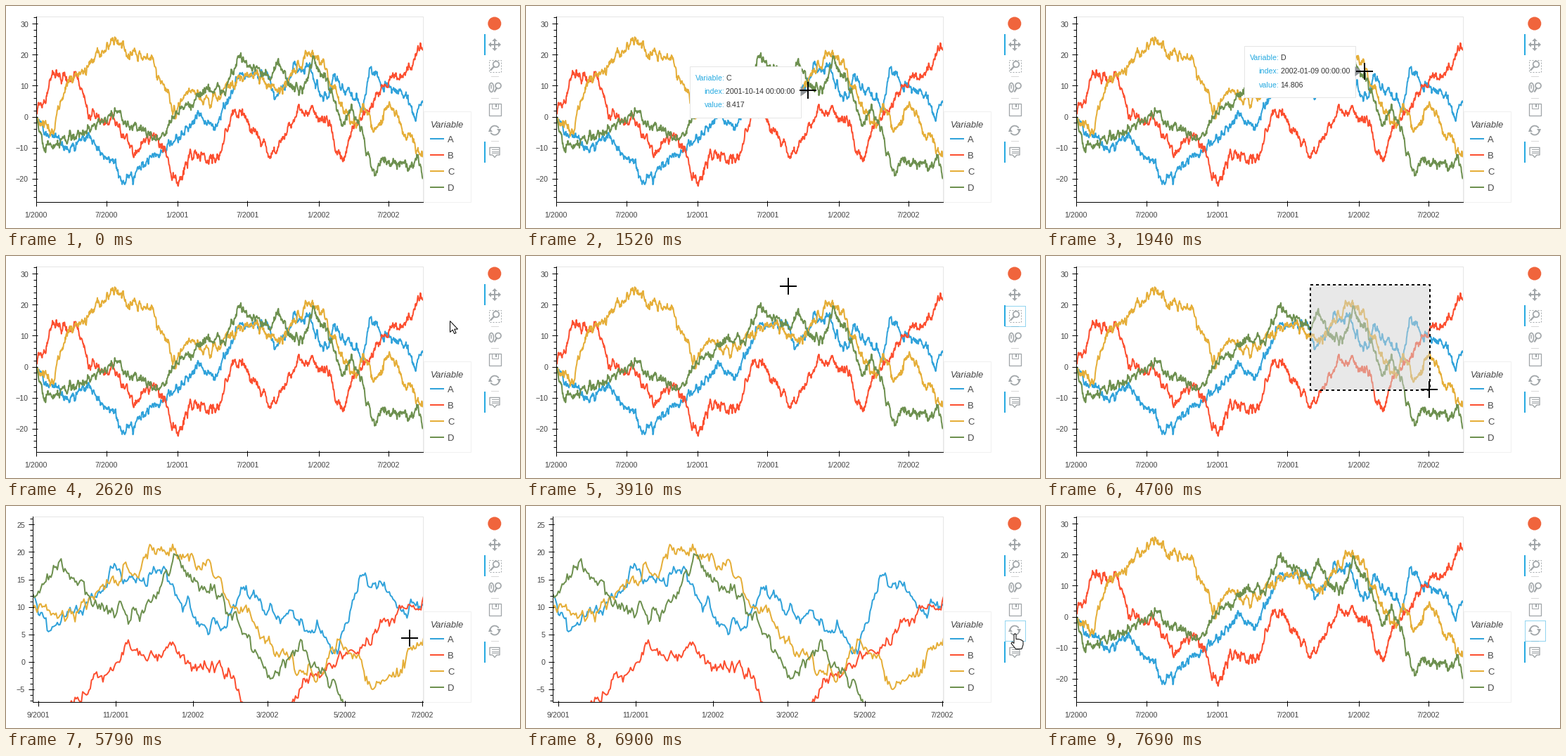
Recreate the animation shown at these times as a matplotlib script. Size 731x316 px, loop 8 s.

```python
import numpy as np
import matplotlib.pyplot as plt
from matplotlib.animation import FuncAnimation
from matplotlib.patches import Arc, Circle, Ellipse, Polygon, Rectangle

W, H, DPI = 731, 316, 100
PX = 72 / DPI  # points per pixel
STEP, LOOP = 40, 8000
COLORS = {"A": "#30a2da", "B": "#fc4f30", "C": "#e5ae38", "D": "#6d904f"}
ICON, ACCENT, INK, PALE = "#a1a6a9", "#26aae1", "#444444", "#e5e5e5"
RIGHT, TOP, BOTTOM = 592.5, 14.5, 278.5

plt.rcParams["font.family"] = "Liberation Sans"
fig = plt.figure(figsize=(W / DPI, H / DPI), dpi=DPI, facecolor="white")
ax = fig.add_axes([0, 0, 1, 1])
ax.set_xlim(0, W)
ax.set_ylim(H, 0)
ax.axis("off")


# ---------- drawing helpers ----------
def line(xs, ys, color="black", width=1, z=4, **kw):
    return ax.plot(xs, ys, color=color, lw=width * PX, zorder=z, **kw)[0]


def text(x, y, s, size=10.67, color=INK, ha="left", z=5, **kw):
    return ax.text(x, y, s, fontsize=size * PX, color=color, ha=ha,
                   va="baseline", zorder=z, **kw)


def shape(patch, face="none", edge="none", width=1, z=4, **kw):
    patch.set(facecolor=face, edgecolor=edge, linewidth=width * PX, zorder=z, **kw)
    return ax.add_patch(patch)


def box(x0, y0, x1, y1, **kw):
    return shape(Rectangle((x0, y0), x1 - x0, y1 - y0), **kw)


def show(artists, on):
    for a in artists:
        a.set_visible(bool(on))


# ---------- data: turning points (day, value) plus mean-reverting noise ----------
TURNS = {
    "A": [(0, 0), (85, -11), (131, -5), (228, -20), (350, -9), (425, 1),
          (460, -3), (530, 15), (606, 13), (621, 5), (672, 16), (706, 15),
          (753, 5), (771, 13), (845, 4), (865, 15), (900, 9), (945, 8),
          (980, 0), (1000, 5)],
    "B": [(0, 0), (45, 14), (109, 12), (142, 0), (205, -1), (252, -12),
          (310, -6), (367, -21), (405, -12), (470, -14), (500, -2), (530, 1),
          (606, -12), (650, -5), (683, 4), (759, -2), (777, -12), (795, -12),
          (840, 1), (861, 0), (886, 8), (960, 15), (1000, 23)],
    "C": [(0, 0), (45, -5), (75, 10), (130, 15), (200, 26), (240, 20),
          (300, 19), (360, 1), (400, 10), (440, 4), (545, 14), (640, 8),
          (703, 21), (745, 18), (788, 3), (828, -2), (845, 4), (878, -5),
          (915, 5), (945, -4), (1000, -11)],
    "D": [(0, 0), (22, -10), (80, -8), (205, 0), (320, -7), (360, 0),
          (440, 9), (485, 8), (525, 20), (604, 12), (621, 19), (665, 8),
          (690, 9), (718, 17), (752, 13), (795, -3), (817, 3), (850, -8),
          (876, -20), (895, -14), (975, -16), (988, -13), (1000, -20)],
}
DAYS = np.arange(1001)
rng = np.random.default_rng(7)


def series(turns):
    noise = np.zeros(DAYS.size)
    for i, shock in enumerate(rng.normal(0, 0.65, DAYS.size - 1)):
        noise[i + 1] = 0.8 * noise[i] + shock
    return np.interp(DAYS, *zip(*turns)) + noise


DATA = {name: series(turns) for name, turns in TURNS.items()}


# ---------- the two zoom levels ----------
def build_view(left, day0, per_day, zero, per_unit, months, majors, minors):
    """Curves, frame, ticks and labels of one zoom level."""
    def px(day):
        return left + (np.asarray(day) - day0) * per_day

    def py(value):
        return zero - np.asarray(value) * per_unit

    clip = Rectangle((left, TOP), RIGHT - left, BOTTOM - TOP,
                     transform=ax.transData)
    parts = [line([left, RIGHT, RIGHT], [TOP, TOP, BOTTOM], PALE, z=1)]
    for name, color in COLORS.items():
        curve = line(px(DAYS), py(DATA[name]), color, 2, z=2,
                     solid_joinstyle="round")
        curve.set_clip_path(clip)
        parts.append(curve)
    parts.append(line([left, left, RIGHT], [TOP, BOTTOM, BOTTOM], z=3))
    tick = dict(color="black", lw=PX, zorder=3)
    parts.append(ax.hlines(py(majors), left - 6, left + 2, **tick))
    parts.append(ax.hlines(py(minors), left - 4, left, **tick))
    parts.append(ax.vlines(px(list(months)), BOTTOM - 2, BOTTOM + 6, **tick))
    for m in majors:
        parts.append(text(left - 10.5, py(m) + 4.3,
                          str(m).replace("-", "\u2212"), ha="right"))
    for day, label in months.items():
        parts.append(text(px(day), 301, label, ha="center"))
    return parts


wide_parts = build_view(
    42.5, 0, 0.55, 157.5, 4.41,
    {0: "1/2000", 182: "7/2000", 366: "1/2001", 547: "7/2001",
     731: "1/2002", 912: "7/2002"},
    range(-20, 31, 10), range(-26, 33, 2))
close_parts = build_view(
    37.5, 604.3, 1.802, 221.8, 7.82,
    {609: "9/2001", 670: "11/2001", 731: "1/2002", 790: "3/2002",
     851: "5/2002", 912: "7/2002"},
    range(-5, 26, 5), range(-7, 27))

# ---------- legend ----------
box(593.5, 149.5, 660.5, 278.5, face="white", edge="#f0f0f0")
text(604, 173, "Variable", 13, style="italic")
for i, (name, color) in enumerate(COLORS.items()):
    y = 189 + 23 * i
    line([603, 623], [y, y], color, 2, solid_capstyle="butt")
    text(628, y + 5, name, 13)


# ---------- toolbar ----------
def lens(cx, cy, r, hx, hy):
    shape(Circle((cx, cy), r), edge=ICON, width=1.7)
    k = r / np.hypot(hx - cx, hy - cy)
    line([cx + (hx - cx) * k, hx], [cy + (hy - cy) * k, hy], ICON, 2.2)


def pan_icon(cx, cy):
    line([cx - 6, cx + 6], [cy, cy], ICON, 2)
    line([cx, cx], [cy - 6, cy + 6], ICON, 2)
    for dx, dy in ((1, 0), (-1, 0), (0, 1), (0, -1)):
        tip = [(9, 0), (5, 3.8), (5, -3.8)]
        shape(Polygon([(cx + a * dx - b * dy, cy + a * dy + b * dx)
                       for a, b in tip]), face=ICON)


def zoom_icon(cx, cy):
    box(cx - 8.5, cy - 8.5, cx + 8.5, cy + 8.5, edge=ICON,
        linestyle=(0, (2, 2)))
    lens(cx + 2, cy - 2, 4.3, cx - 5.5, cy + 6)


def wheel_icon(cx, cy):
    shape(Ellipse((cx - 4.7, cy), 6.4, 13), edge=ICON, width=1.6)
    line([cx - 4.7, cx - 4.7], [cy - 3.5, cy + 1], ICON, 1.5)
    lens(cx + 5, cy - 2.5, 4, cx, cy + 5.5)


def save_icon(cx, cy):
    box(cx - 8.5, cy - 8.5, cx + 8.5, cy + 8.5, edge=ICON, width=1.3)
    box(cx - 4.5, cy - 8.5, cx + 4.5, cy - 1.5, edge=ICON)
    box(cx + 1, cy - 7, cx + 3, cy - 3, face=ICON)


def reset_icon(cx, cy):
    for start, s in ((190, 1), (10, -1)):
        shape(Arc((cx, cy), 13, 13, theta1=start, theta2=start + 140),
              edge=ICON, width=1.8)
        shape(Polygon([(cx + s * 9, cy - s * 2), (cx + s * 3, cy - s * 2),
                       (cx + s * 7, cy + s * 3)]), face=ICON)


def hover_icon(cx, cy):
    shape(Polygon([(cx - 7, cy - 6.5), (cx + 7, cy - 6.5), (cx + 7, cy + 4),
                   (cx + 3, cy + 4), (cx, cy + 7.5), (cx - 3, cy + 4),
                   (cx - 7, cy + 4)]), edge=ICON, width=1.4, joinstyle="round")
    for dy in (-4, -1.5, 1):
        line([cx - 4.5, cx + 4.5], [cy + dy, cy + dy], ICON, 1)


shape(Circle((694.8, 25), 9.5), face="#f0643c")
for icon, y in ((pan_icon, 55), (zoom_icon, 85), (wheel_icon, 116),
                (save_icon, 147), (reset_icon, 177), (hover_icon, 208)):
    icon(695, y)
for y in (99.5, 130.5, 191.5):
    line([689.5, 699.5], [y, y], "#d8d8d8")


def active_bar(y):
    return box(680, y, 682, y + 30, face=ACCENT)


def focus_ring(y):
    return box(680.5, y + 0.5, 709.5, y + 29.5, edge=ACCENT, linestyle=(0, (1, 1)))


active_bar(193)
pan_bar, zoom_bar = active_bar(40), active_bar(70)
zoom_ring, reset_ring = focus_ring(70), focus_ring(162)


# ---------- overlays ----------
def hover_tip(x, y, *values):
    parts = [box(x - 169, y - 36, x - 11, y + 37, face="white", edge=PALE, z=6),
             shape(Polygon([(x - 11, y - 7), (x - 1, y), (x - 11, y + 7)]),
                   face="#909599", z=6)]
    for i, (label, value) in enumerate(zip(("Variable:", "index:", "value:"), values)):
        row = y - 16 + 19.5 * i
        parts.append(text(x - 119, row, label, color=ACCENT, ha="right", z=7))
        parts.append(text(x - 117, row, value, color="#333333", z=7))
    return parts


# Each tip with the time span in which it is up.
tips = [
    (750, 1640, hover_tip(401.5, 121.5, "C", "2001-10-14 00:00:00", "8.417")),
    (1780, 2420, hover_tip(450.5, 93, "D", "2002-01-09 00:00:00", "14.806")),
    (4300, 4380, hover_tip(423.5, 88, "A", "2001-11-21 00:00:00", "15.942")),
]
title_tip = [box(703.5, 195.5, 745, 217.5, face="white", edge="#999999", z=7),
             text(708, 211, "Reset", 12, z=8)]
CORNER = (376, 41)
selection = box(*CORNER, *CORNER, face=(0.827, 0.827, 0.827, 0.5), edge="black",
                width=2, z=3.5, linestyle=(0, (2, 2)))

ARROW = np.array([(0, 0), (0, 16), (3.7, 12.6), (6.2, 18), (8.6, 17),
                  (6.2, 11.6), (11, 11.6)])
HAND = np.array([(-1.5, 1.5), (0, 0), (1.5, 1.5), (1.5, 8), (5, 8), (8.5, 9),
                 (11.5, 11), (11.5, 16), (9.5, 22), (1, 22), (-5.5, 14),
                 (-4, 12), (-1.5, 14)])
arrow = shape(Polygon(ARROW), face="white", edge="black", z=9)
hand = shape(Polygon(HAND), face="white", edge="black", z=9)
cross = line([0], [0], z=9, marker="+", ms=24 * PX, mew=2 * PX)

# Cursor moves: start, end, then where the move ends.
ENTRY = (760, 140)
MOVES = [
    (430, 780, 401, 120), (1590, 1940, 453, 93), (2330, 2620, 631, 92),
    (2700, 2950, 695, 85), (3220, 3910, 372.5, 43), (3990, 4070, *CORNER),
    (4110, 4700, 545, 190), (5720, 5790, 574, 188), (5790, 6000, 674, 198),
    (6080, 6290, 695, 181), (7450, 7690, 760, 170),
]


def cursor_at(t):
    pos = np.array(ENTRY, float)
    for start, end, *goal in MOVES:
        pos += (goal - pos) * np.clip((t - start) / (end - start), 0, 1)
    return pos


def move_cursor(t):
    x, y = cursor_at(t)
    inside = 500 <= t < 7690
    over_plot = x < 594
    over_tool = 680 <= x <= 710 and (70 <= y <= 100 or 162 <= y <= 192)
    cross.set_data([x], [y])
    arrow.set_xy(ARROW + (x + 0.5, y + 0.5))
    hand.set_xy(HAND + (x + 0.5, y + 0.5))
    show([cross], inside and over_plot)
    show([hand], inside and over_tool)
    show([arrow], inside and not over_plot and not over_tool)
    return x, y


def update(n):
    t = n * STEP + 30
    zoomed = 4960 <= t < 7050
    show(wide_parts, not zoomed)
    show(close_parts, zoomed)
    x, y = move_cursor(t)
    selection.set_width(x + 0.5 - CORNER[0])
    selection.set_height(y + 0.5 - CORNER[1])
    show([selection], 4160 <= t < 4960)
    for start, end, parts in tips:
        show(parts, start <= t < end)
    show(title_tip, 6700 <= t < 6900)
    show([pan_bar], t < 3200)
    show([zoom_bar], t >= 3200)
    show([zoom_ring], 3200 <= t < 4070)
    show([reset_ring], t >= 6900)
    return []


anim = FuncAnimation(fig, update, frames=LOOP // STEP, interval=STEP,
                     init_func=lambda: update(0), repeat=True, blit=False)
plt.show()
```
